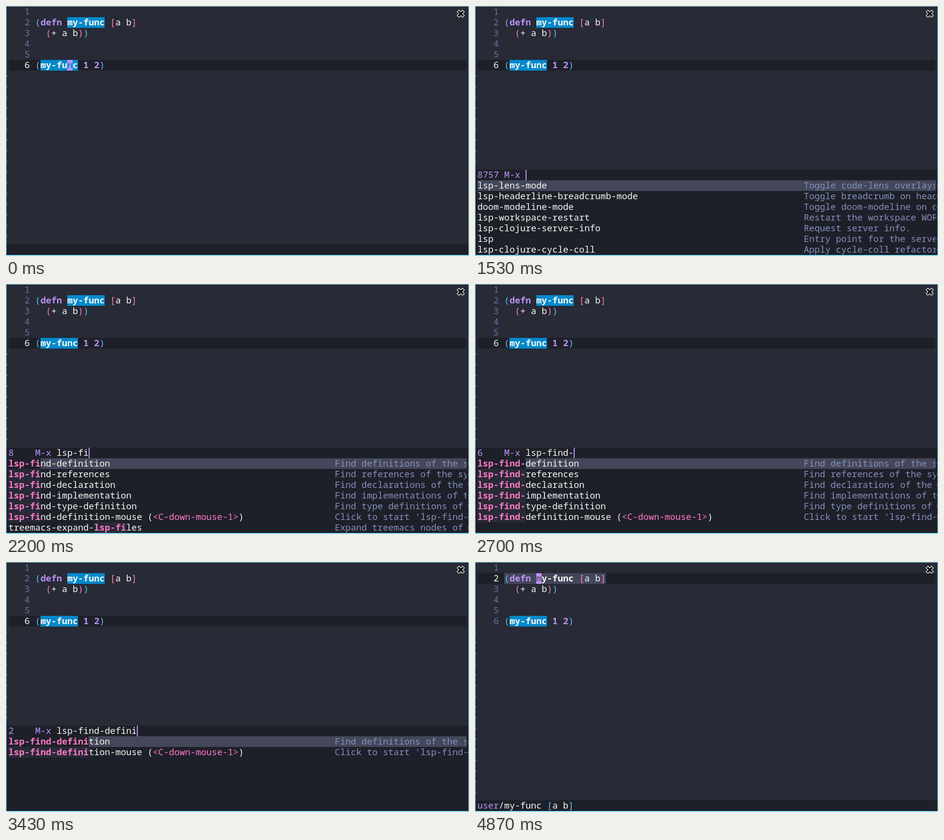
An HTML page for the animation above (5260 ms loop, 952 by 515 pixels).

```html
<!DOCTYPE html>
<html lang="en">
<head>
<meta charset="utf-8">
<title>Find definition</title>
<style>
  html, body { margin: 0; width: 100%; height: 100%; overflow: hidden; background: #282a36; }
  #stage {
    position: absolute; left: 0; top: 0; width: 952px; height: 515px; overflow: hidden;
    background: #282a36; color: #f8f8f2;
    font: 18.333px/20px "Noto Sans Mono", "DejaVu Sans Mono", monospace;
    font-variant-ligatures: none; font-kerning: none;
  }
  #stage svg { position: absolute; left: 0; top: 0; }
  #edge {
    position: absolute; inset: 0; box-sizing: border-box;
    border: 1px solid #8be9fd; border-bottom-width: 2px;
  }
  .panel { position: absolute; left: 1px; right: 1px; bottom: 2px; background: #1e2029; }
  .row { position: absolute; left: 5px; width: 942px; height: 22px; overflow: hidden; white-space: pre; }
  .row span { display: inline-block; height: 22px; vertical-align: top; }
  .row .note { position: absolute; left: 671px; color: #8490bd; }
  .line { background: #1e2029; }
  .sel { background: #44475a; }
  .num { color: #6272a4; }
  .blue { color: #61bfff; }
  .pink { color: #ff79c6; }
  .purple { color: #bd93f9; }
  .bold { font-weight: 700; }
  .mark { background: #0189cc; }
  .flash { background: #44475a; }
  .match { color: #ff79c6; font-weight: 700; background: #282a36; }
  .sel .match { background: #1e2029; }
  .block { background: #bd93f9; color: #0189cc; }
  .flash.block { background: #bd93f9; color: #44475a; }
  .bar { position: absolute; width: 2px; height: 22px; background: #bd93f9; }
  #stage .cut { left: 949px; fill: #565761; }
</style>
</head>
<body>
<div id="stage">
  <svg width="952" height="515" shape-rendering="crispEdges">
    <pattern id="tilde" y="133" width="5" height="22" patternUnits="userSpaceOnUse">
      <path fill="#565761" d="M2 10h3v1h-3z M1 11h2v1h-2z M4 11h1v1h-1z M1 12h1v1h-1z"/>
    </pattern>
    <rect y="133" width="5" height="352" fill="url(#tilde)"/>
  </svg>
  <div id="view"></div>
  <div id="edge"></div>
  <svg width="952" height="515" fill="none">
    <path stroke="#fff" stroke-width="6.5" d="M929 10L941 22M941 10L929 22"/>
    <path stroke="#000" stroke-width="4" d="M929.8 10.8L940.2 21.2M940.2 10.8L929.8 21.2"/>
  </svg>
</div>
<script>
const LOOP = 5260, COL = 11, ROW = 22, LEFT = 5;

const notes = {
  'lsp-lens-mode': 'Toggle code-lens overlays.',
  'lsp-headerline-breadcrumb-mode': 'Toggle breadcrumb on headerline.',
  'doom-modeline-mode': 'Toggle doom-modeline on or off.',
  'lsp-workspace-restart': 'Restart the workspace WORKSPACE.',
  'lsp-clojure-server-info': 'Request server info.',
  'lsp': 'Entry point for the server startup.',
  'lsp-clojure-cycle-coll': 'Apply cycle-coll refactoring.',
  'lsp-install-server': 'Interactively install server.',
  'lsp-find-definition': 'Find definitions of the symbol.',
  'lsp-find-references': 'Find references of the symbol.',
  'lsp-find-declaration': 'Find declarations of the symbol.',
  'lsp-find-implementation': 'Find implementations of the symbol.',
  'lsp-find-type-definition': 'Find type definitions of the symbol.',
  'lsp-find-definition-mouse': 'Click to start ‘lsp-find-definition’.',
  'treemacs-expand-lsp-files': 'Expand treemacs nodes of sources.'
};
const names = Object.keys(notes);
const keys = { 'lsp-find-definition-mouse': '<C-down-mouse-1>' };

// Each step: start time, then the editor state from there on.
const prompt = (at, input, count, home) => ({ at, input, count, home });
const steps = [
  { at: 0, cursor: 11 },
  { at: 370, cursor: 10 },
  { at: 830, cursor: 10, echo: [['', 'SPC-']] },
  prompt(1530, '', 8757),
  prompt(1630, 'l', 5312),
  prompt(1770, 'ls', 412),
  prompt(1900, 'lsp', 260),
  prompt(2030, 'lsp-', 250),
  prompt(2200, 'lsp-fi', 8),
  prompt(2330, 'lsp-fin', 6),
  prompt(2570, 'lsp-find', 6),
  prompt(2700, 'lsp-find-', 6),
  prompt(2970, 'lsp-find-de', 3),
  prompt(3130, 'lsp-find-def', 2),
  prompt(3300, 'lsp-find-defi', 2),
  prompt(3430, 'lsp-find-defini', 2),
  prompt(4230, 'lsp-find-defini', 2, true),
  { at: 4400, jumped: true },
  { at: 4870, jumped: true,
    echo: [['purple', 'user'], ['', '/my-func '], ['blue', '['], ['', 'a b'], ['blue', ']']] }
];

const esc = s => s.replace(/</g, '&lt;');
const span = ([cls, text]) => `<span class="${cls}">${esc(text)}</span>`;
const row = (top, parts, cls = '') =>
  `<div class="row ${cls}" style="top:${top}px">${parts.map(span).join('')}</div>`;
const panel = height => `<div class="panel" style="height:${height}px"></div>`;

function code({ cursor, jumped }) {
  const f = jumped ? 'flash ' : '';
  const name = jumped
    ? [['flash block', 'm'], ['flash bold', 'y-func']]
    : [['mark bold', 'my-func']];
  const i = cursor - 6;
  const call = cursor
    ? [['mark bold', 'my-func'.slice(0, i)], ['block bold', 'my-func'[i]], ['mark bold', 'my-func'.slice(i + 1)]]
    : [['mark bold', 'my-func']];
  const lines = [
    [],
    [[f + 'blue', '('], [f + 'purple bold', 'defn'], [f, ' '], ...name, [f, ' '],
      [f + 'pink', '['], [f, 'a b'], [f + 'pink', ']']],
    [['', '  '], ['pink', '('], ['', '+ a b'], ['pink', ')'], ['blue', ')']],
    [],
    [],
    [['blue', '('], ...call, ['purple bold', ' 1 2'], ['blue', ')']]
  ];
  const current = jumped ? 1 : 5;
  return lines.map((parts, n) => {
    const here = n === current;
    return row(1 + n * ROW, [[here ? '' : 'num', `   ${n + 1} `], ...parts], here ? 'line' : '');
  }).join('');
}

function candidate(name, input, top, selected) {
  const from = name.indexOf(input), to = from + input.length;
  const parts = [['', name.slice(0, from)], ['match', name.slice(from, to)], ['', name.slice(to)]];
  if (keys[name]) parts.push(['', ' ('], ['pink', keys[name]], ['', ')']);
  parts.push(['note', notes[name]]);
  const cut = notes[name].length < 25 ? '' :
    `<svg class="cut" style="left:949px;top:${top + 7}px" width="2" height="8" shape-rendering="crispEdges">` +
    '<path d="M1 0h1v1h-1zM0 3h2v2h-2zM1 7h1v1h-1z"/></svg>';
  return row(top, parts, selected ? 'sel' : '') + cut;
}

function minibuffer({ input, count, home }) {
  const top = 337;
  const label = String(count).padEnd(5) + 'M-x ';
  const list = names.filter(n => n.includes(input)).slice(0, 7);
  const chosen = Math.max(0, list.indexOf(input));
  const x = LEFT + (home ? 0 : (label.length + input.length) * COL);
  return panel(176) +
    row(top, [['purple', label], ['', input]]) +
    `<div class="bar" style="left:${x}px;top:${top}px"></div>` +
    list.map((n, i) => candidate(n, input, top + (i + 1) * ROW, i === chosen)).join('');
}

const view = document.getElementById('view');
const start = performance.now();
let shown;

function draw() {
  const t = (performance.now() - start) % LOOP;
  const step = steps.findLast(s => s.at <= t);
  if (step !== shown) {
    shown = step;
    view.innerHTML = code(step) +
      (step.count ? minibuffer(step) : panel(22) + row(491, step.echo || []));
  }
  requestAnimationFrame(draw);
}
draw();
</script>
</body>
</html>
```
